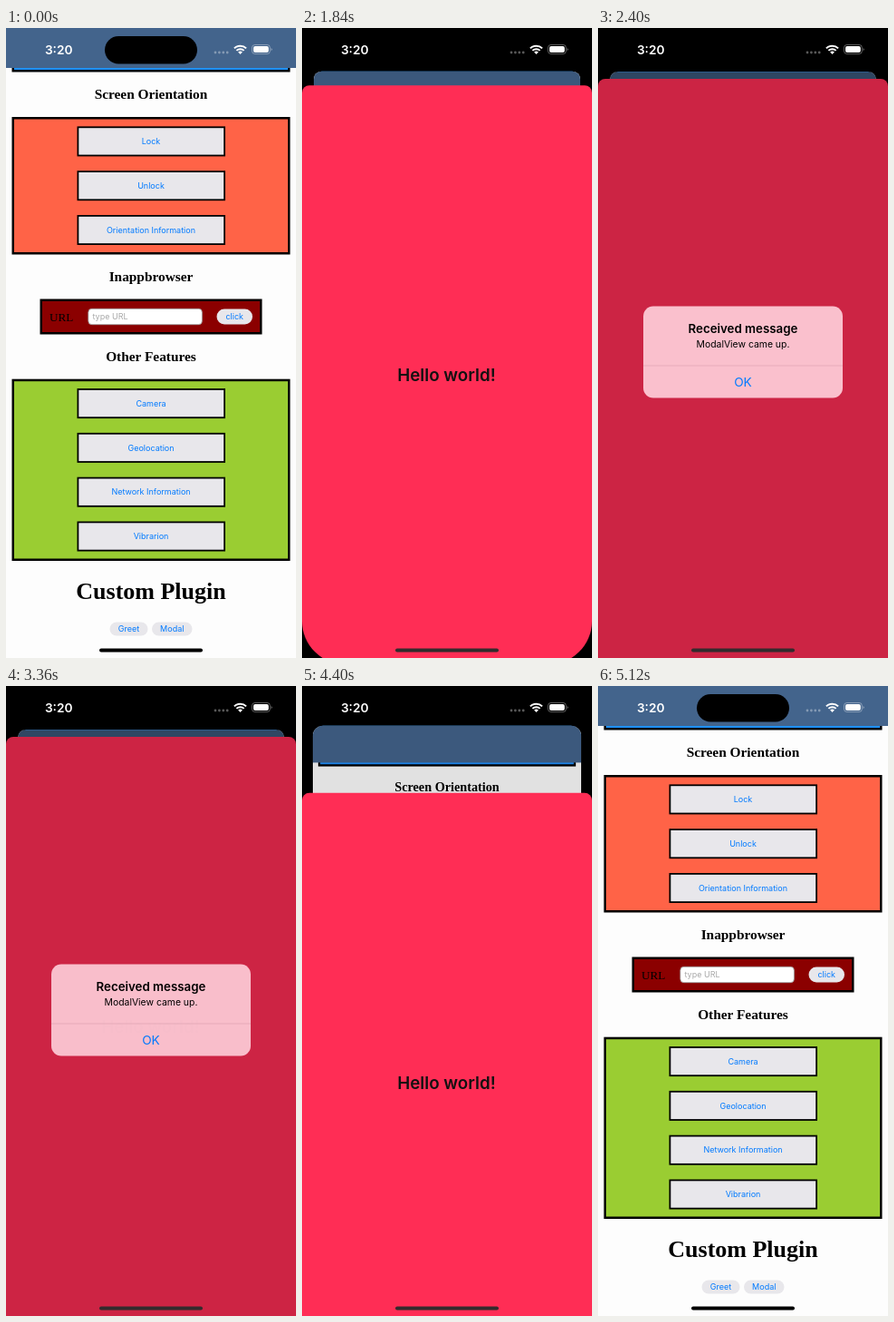
Write an HTML page that moves like this. It is 320x694 px and loops after 5.16 s.

```html
<!DOCTYPE html>
<html lang="en">
<head>
<meta charset="utf-8">
<title>Modal demo</title>
<style>
  html, body { margin: 0; height: 100%; overflow: hidden; background: #000; }
  svg { display: block; width: 100vw; height: 100vh; }
  text { font-family: Inter, Roboto, sans-serif; text-anchor: middle; }
  .serif { font-family: "Liberation Serif", "Times New Roman", serif; }
  .head { font-size: 15.36px; font-weight: 700; }
  .label { font-size: 9px; fill: #007aff; }
  .left { text-anchor: start; }
  .box { stroke: #000; }
  .pill { fill: #e8e7eb; }
</style>
</head>
<body>
<svg viewBox="0 0 320 694">
  <clipPath id="pageClip"><rect id="pageShape" width="320" height="694"/></clipPath>
  <rect width="320" height="694"/>

  <g id="page" clip-path="url(#pageClip)">
    <rect width="320" height="694" fill="#fdfdfd"/>
    <g id="content"></g>
    <rect id="tap" x="158.5" y="652" width="50" height="19.5" rx="8" fill-opacity=".3"/>
    <rect id="pageDim" width="320" height="694"/>
  </g>

  <g id="sheet">
    <path id="sheetShape" fill="#ff2d55"/>
    <text x="159.5" y="326" font-size="18.8" font-weight="600" fill="#111">Hello world!</text>
  </g>

  <rect id="alertDim" width="320" height="694"/>
  <g id="alert">
    <rect x="50" y="306.5" width="220" height="101" rx="11" fill="#fac0cd"/>
    <path d="M50 372H270" stroke="#dfa5b2" stroke-width=".7"/>
    <text x="160" y="335.8" font-size="13.3" font-weight="600">Received message</text>
    <text x="160" y="352.3" font-size="10.4">ModalView came up.</text>
    <text x="160" y="395.2" font-size="13.7" fill="#007aff">OK</text>
  </g>

  <g fill="#fff">
    <rect x="109" y="9" width="102" height="30.5" rx="15.25" fill="#000"/>
    <text x="58.2" y="28.7" font-size="13.7" font-weight="600">3:20</text>
    <g fill-opacity=".35">
      <circle cx="231" cy="27" r="1.4"/><circle cx="235.4" cy="27" r="1.4"/>
      <circle cx="239.8" cy="27" r="1.4"/><circle cx="244.2" cy="27" r="1.4"/>
    </g>
    <path d="M258.5 29l-2.4-2.4a3.4 3.4 0 0 1 4.8 0z"/>
    <g fill="none" stroke="#fff" stroke-width="2">
      <path d="M254.4 24.9a5.8 5.8 0 0 1 8.2 0"/>
      <path d="M251.9 22.4a9.3 9.3 0 0 1 13.2 0"/>
    </g>
    <rect x="271.5" y="18.5" width="19.8" height="10" rx="3" fill="none" stroke="#fff" stroke-opacity=".4" stroke-width=".9"/>
    <rect x="273" y="20" width="16.8" height="7" rx="2"/>
    <path d="M292.6 22v3.2a1.8 1.8 0 0 0 0-3.2z" fill-opacity=".5"/>
  </g>
  <rect id="home" x="103" y="683.5" width="114" height="4" rx="2"/>
</svg>

<script>
const LOOP = 5160, STEP = 40, REST = 56, HEIGHT = 694 - REST;
const el = Object.fromEntries([...document.querySelectorAll('[id]')].map(e => [e.id, e]));

const box = (x, y, w, h, fill, line) =>
  `<rect class="box" x="${x + line / 2}" y="${y + line / 2}" width="${w - line}" height="${h - line}" fill="${fill}" stroke-width="${line}"/>`;
const label = (x, y, text) => `<text class="label" x="${x}" y="${y + 3.2}">${text}</text>`;
const heading = (y, text) => `<text class="serif head" x="160" y="${y}">${text}</text>`;
const pill = (x, y, w, h, text) =>
  `<rect class="pill" x="${x}" y="${y}" width="${w}" height="${h}" rx="${h / 2}"/>` + label(x + w / 2, y + h / 2, text);
const panel = (y, h, fill, names) => box(6.5, y, 307, h, fill, 2.5) + names.map((name, i) => {
  const top = y + 10.4 + i * 48.8;
  return box(78.5, top, 163.5, 33, '#e8e7eb', 1.8) + label(160, top + 16.5, name);
}).join('');

el.content.innerHTML =
  box(6.5, -20, 307, 68.5, '#1e90ff', 2.5) +
  '<rect width="320" height="44" fill="#43648c"/>' +
  heading(78, 'Screen Orientation') +
  panel(98, 151.5, '#ff6347', ['Lock', 'Unlock', 'Orientation Information']) +
  heading(278.7, 'Inappbrowser') +
  box(37.5, 298.5, 245, 39, '#8b0000', 2.5) +
  '<text class="serif left" x="48" y="322.5" font-size="13.13">URL</text>' +
  '<rect x="90.8" y="309.3" width="125.6" height="17.4" rx="4" fill="#fff" stroke="#999" stroke-width=".8"/>' +
  '<text class="left" x="95.5" y="321.2" font-size="9" fill="#a9a9a9">type URL</text>' +
  pill(232.5, 309.5, 39.5, 17, 'click') +
  heading(366.5, 'Other Features') +
  panel(386.7, 200.3, '#9acd32', ['Camera', 'Geolocation', 'Network Information', 'Vibrarion']) +
  '<text class="serif" x="160" y="629" font-size="26" font-weight="700">Custom Plugin</text>' +
  pill(114.5, 654.5, 42, 15, 'Greet') +
  pill(161, 654.5, 44.5, 15, 'Modal');

// Critically damped spring from 0 to 1
function spring(ms, rate) {
  const u = Math.max(0, ms) / 1000 * rate;
  return 1 - (1 + u) * Math.exp(-u);
}

// Progress that springs in, holds, and springs out
function progress(t, a, b, rateIn, rateOut) {
  if (t < a.from || t >= b.end) return 0;
  if (t < a.end) return spring(t - a.start, rateIn);
  return t < b.from ? 1 : 1 - spring(t - b.start, rateOut);
}

function draw(t) {
  const p = progress(t, { from: 1480, start: 1466, end: 2000 }, { from: 4400, start: 4370, end: 4960 }, 17.4, 17.4);
  const a = progress(t, { from: 2040, start: 2030, end: 2400 }, { from: 3360, start: 3350, end: 3880 }, 20, 15.3);

  el.page.setAttribute('transform', `translate(160 ${347 + 19.9 * p}) scale(${1 - 0.082 * p}) translate(-160 -347)`);
  el.pageShape.setAttribute('rx', p ? 45 - 36 * p : 0);
  el.pageDim.setAttribute('fill-opacity', 0.12 * p);
  el.tap.style.display = t >= 1480 && t < 1680 ? '' : 'none';

  const r = p < 1 ? 48 : 0;
  el.sheet.style.display = p ? '' : 'none';
  el.sheet.setAttribute('transform', `translate(0 ${694 - HEIGHT * p})`);
  el.sheetShape.setAttribute('d',
    `M0 8a8 8 0 0 1 8-8H312a8 8 0 0 1 8 8V${HEIGHT - r}a${r} ${r} 0 0 1 ${-r} ${r}H${r}a${r} ${r} 0 0 1 ${-r} ${-r}z`);

  const scale = t < 3360 ? 1.2 - 0.2 * a : 1;
  el.alertDim.setAttribute('fill-opacity', 0.2 * a);
  el.alert.setAttribute('opacity', a);
  el.alert.setAttribute('transform', `translate(160 357) scale(${scale}) translate(-160 -357)`);
  el.home.setAttribute('fill', p > 0.01 ? '#332b2d' : '#000');
}

const begin = performance.now();
function tick() {
  const t = (performance.now() - begin) % LOOP;
  draw(Math.floor(t / STEP) * STEP);
  requestAnimationFrame(tick);
}
tick();
</script>
</body>
</html>
```
